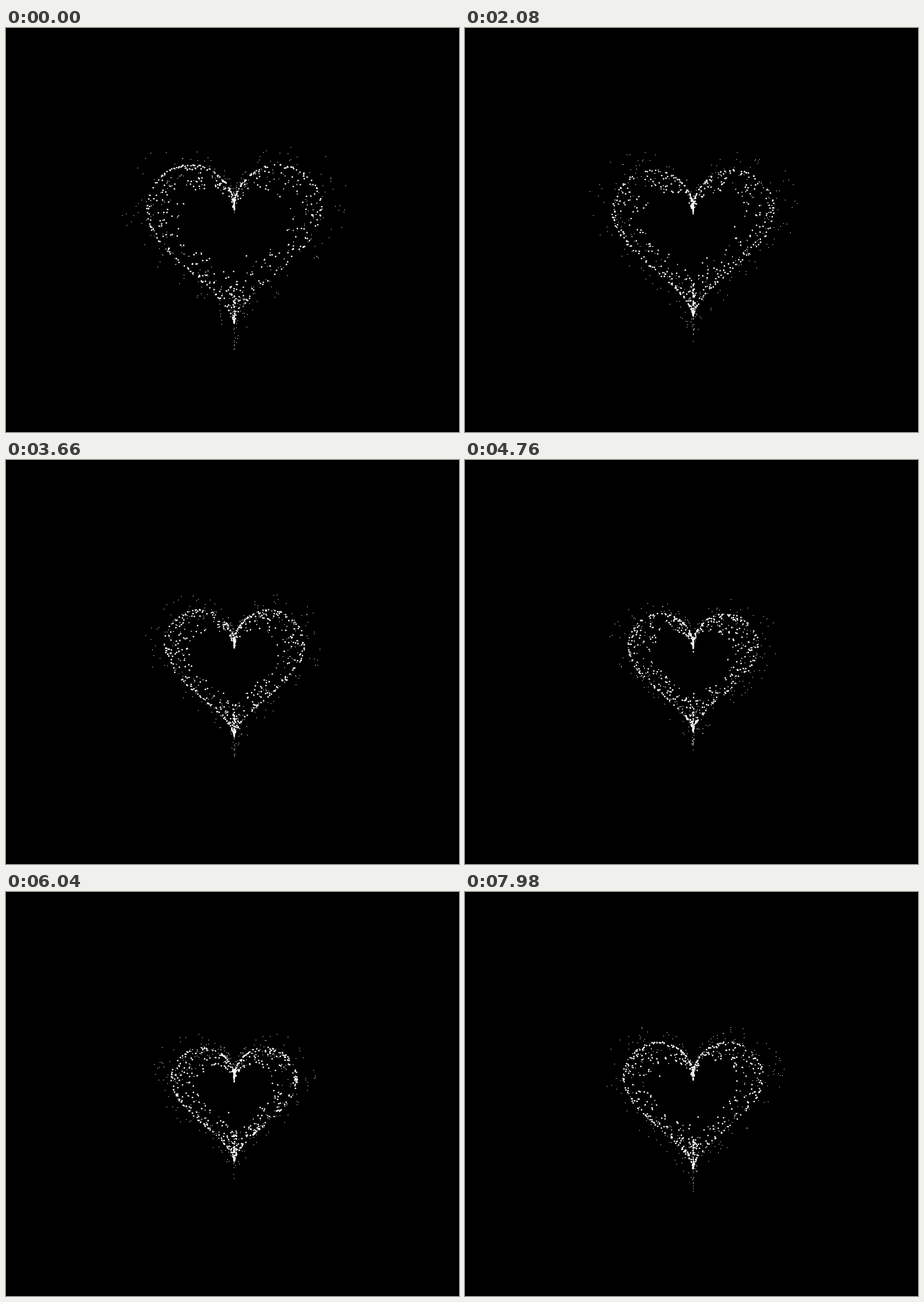
These frames come from a looping animation (793x706 px, 8 s). An HTML page with a canvas:

```html
<!DOCTYPE html>
<html lang="en">
<head>
<meta charset="utf-8">
<title>Particle heart</title>
<style>
  html, body { margin: 0; width: 100%; height: 100%; overflow: hidden; background: #000; }
  canvas { display: block; }
</style>
</head>
<body>
<canvas id="stage" width="793" height="706"></canvas>
<script>
const ctx = document.getElementById('stage').getContext('2d');
const LOOP = 8000, STEP = 140, LEAD = 20;
const CX = 399.5, CY = 353.5;
const PARTS = 3, PART_DELAY = 20;
// Spans in which the picture stands still: [from, to]
const HOLDS = [[700, 860], [1100, 1280], [1940, 2080], [7119, 7140]];
// Dots per part: close to the curve, band inside it, stragglers, halo
const LAYERS = [
  { count: 72, scale: r => inward(r, 0.02), big: 0.8 },
  { count: 125, scale: r => 1 - 0.38 * r() ** 1.3, big: 0.66 },
  { count: 18, scale: r => inward(r, 0.14), big: 0.8 },
  { count: 88, scale: r => 0.8 + 0.5 * r(), big: 0 }
];

function seeded(seed) {
  let a = seed | 0;
  return () => {
    a = a + 0x6D2B79F5 | 0;
    let n = Math.imul(a ^ a >>> 15, 1 | a);
    n = n + Math.imul(n ^ n >>> 7, 61 | n) ^ n;
    return ((n ^ n >>> 14) >>> 0) / 4294967296;
  };
}

function inward(rand, beta) {
  return 1 - Math.min(0.6, -beta * Math.log(1 - rand()));
}

function heart(a) {
  return [
    16 * Math.sin(a) ** 3,
    -(13 * Math.cos(a) - 5 * Math.cos(2 * a) - 2 * Math.cos(3 * a) - Math.cos(4 * a))
  ];
}

// Half the width of the outline, a slow breath of twelve seconds
function halfWidth(t) {
  return 132.5 - 22 * Math.cos(2 * Math.PI * (t - 5820) / 12000);
}

function dot(x, y, r) {
  ctx.beginPath();
  ctx.arc(x, y, r, 0, 2 * Math.PI);
  ctx.fill();
}

function speck(x, y) {
  ctx.globalAlpha = 0.85;
  ctx.fillRect(Math.floor(x), Math.floor(y), 1.25, 1.25);
  ctx.globalAlpha = 1;
}

function drawPart(part, step) {
  const rand = seeded((step + 7) * 7919 + part * 104729);
  const unit = halfWidth(step * STEP - LEAD) / 16;
  for (const layer of LAYERS) {
    for (let i = 0; i < layer.count; i++) {
      const [hx, hy] = heart(rand() * 2 * Math.PI);
      const k = unit * layer.scale(rand);
      const x = CX + hx * k, y = CY + hy * k;
      const pick = rand();
      if (pick < layer.big) dot(x, y, 1.35);
      else if (layer.big && pick < 0.88) dot(x, y, 0.95);
      else speck(x, y);
    }
  }
}

function held(t) {
  const hold = HOLDS.find(([from, to]) => t >= from && t < to);
  return hold ? hold[0] : t;
}

let shown = '';
function render(t) {
  const time = held(t);
  const steps = Array.from({ length: PARTS }, (_, p) =>
    Math.floor((time + LEAD - p * PART_DELAY) / STEP));
  const key = steps.join();
  if (key === shown) return;
  shown = key;
  ctx.fillStyle = '#000';
  ctx.fillRect(0, 0, 793, 706);
  ctx.fillStyle = '#fff';
  steps.forEach((step, part) => drawPart(part, step));
}

const start = performance.now();
function tick() {
  render((performance.now() - start) % LOOP);
  requestAnimationFrame(tick);
}
render(0);
requestAnimationFrame(tick);
</script>
</body>
</html>
```
